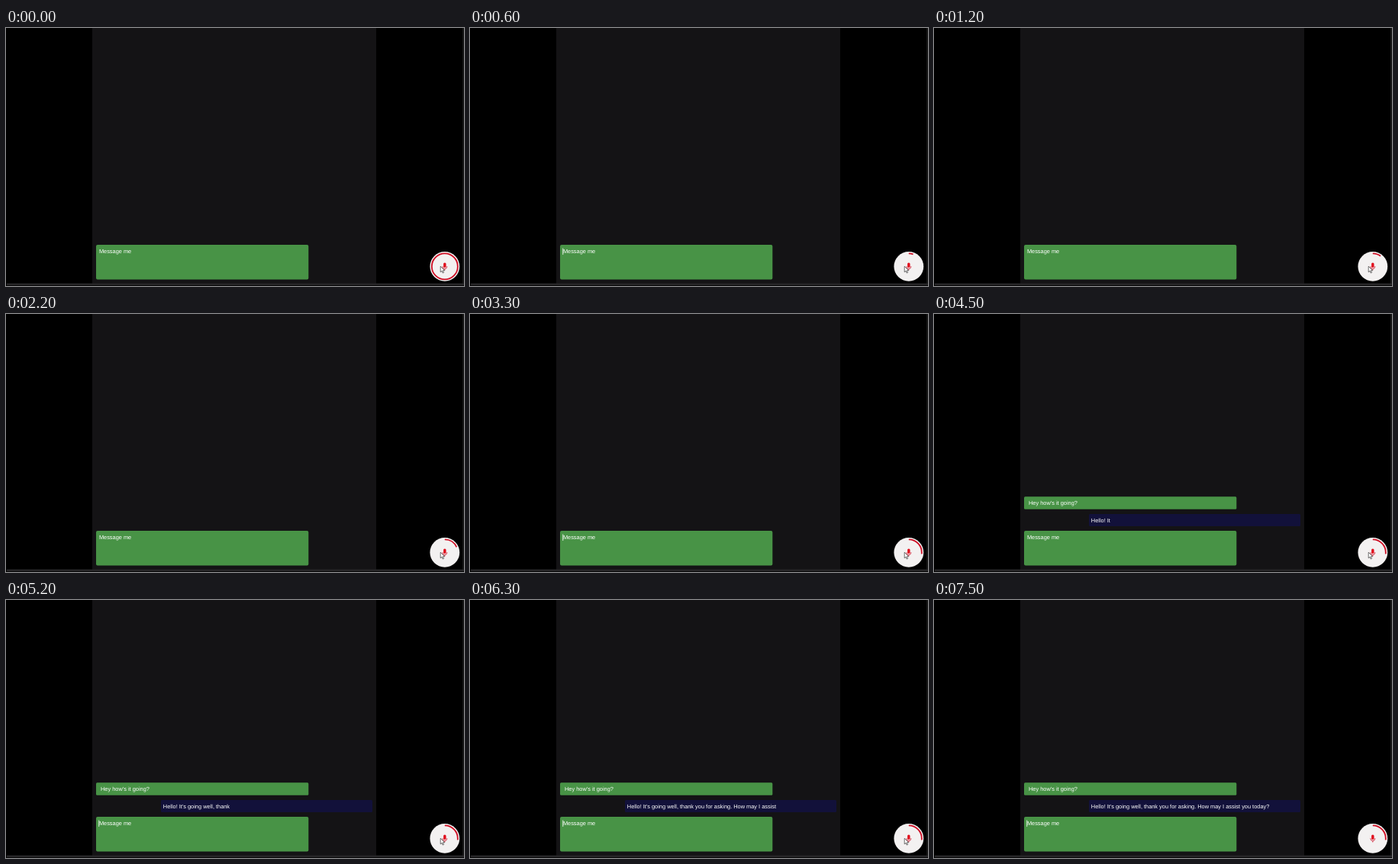
An HTML page for the animation above (8000 ms loop, 600 by 338 pixels).

```html
<!DOCTYPE html>
<html lang="en">
<head>
<meta charset="utf-8">
<title>Voice chat</title>
<style>
  html, body { margin: 0; width: 100%; height: 100%; overflow: hidden; background: #000; }
  svg { display: block; width: 100vw; height: 100vh; }
  text {
    font: 7.4px "Liberation Sans", Arial, sans-serif;
    fill: #fff;
    text-rendering: geometricPrecision;
    white-space: pre;
  }
  .user { fill: #489346; }
  .bot { fill: #12113a; }
  .red { fill: none; stroke: #cf0f25; }
</style>
</head>
<body>
<svg viewBox="0 0 600 338">
  <rect width="600" height="338"/>
  <rect x="113" width="372" height="335" fill="#141315"/>
  <rect x="598" width="2" height="335" fill="#171717"/>
  <rect x="1" y="334.5" width="599" height="2.7" fill="#272628"/>

  <g id="chat">
    <rect class="user" x="118" y="239.3" width="278.3" height="16.4" rx="1.5"/>
    <text x="124" y="250.2">Hey how's it going?</text>
    <rect class="bot" x="203" y="262" width="277" height="16" rx="1.5"/>
    <text id="reply" x="205.8" y="272.6"></text>
  </g>

  <rect class="user" x="118" y="284" width="278.3" height="45.4" rx="2"/>
  <text x="121.9" y="295.2">Message me</text>
  <rect id="caret" x="121.4" y="288.5" width="0.8" height="8.5" fill="#fff"/>

  <circle cx="574.8" cy="312.4" r="19.4" fill="#f3f1f1"/>
  <circle id="ring" class="red" cx="574.8" cy="312.4" r="17" stroke-width="1.8"
    pathLength="360" transform="rotate(-90 574.8 312.4)"/>
  <rect x="573.1" y="307.4" width="3.4" height="6.6" rx="1.7" fill="#e00a1c"/>
  <path class="red" d="M571.9 312v.6a2.9 2.9 0 0 0 5.8 0v-.6M574.8 315.5v2" stroke-width="0.8"/>
  <path id="pointer" d="M569.2 312.2v7.6l1.8-1.6 1.2 2.8 1.3-.6-1.2-2.7h2.4z"
    fill="#fff" stroke="#333" stroke-width="0.7"/>
</svg>
<script>
  const LOOP = 8000;
  const el = id => document.getElementById(id);
  const show = (id, on) => el(id).setAttribute("visibility", on ? "visible" : "hidden");

  // Reply pieces and the tenth of a second at which each arrives.
  const pieces = "Hello|!| It|'s| going| well|,| thank| you| for| asking|.| How| may| I| assist| you| today|?".split("|");
  const arrivals = [43, 44, 45, 47, 48, 49, 51, 52, 53, 54, 56, 57, 58, 60, 61, 63, 64, 65, 66];

  function caretOn(t) {
    return t < 2500 ? t % 1000 >= 500 : t < 4200 || t >= 4700;
  }

  function draw(t) {
    const angle = t < 100 ? 360 : 37 + (Math.min(t, 3300) - 1200) * 0.0286;
    el("ring").setAttribute("stroke-dasharray", angle >= 360 ? "none" : `${angle} 400`);
    el("reply").textContent =
      pieces.filter((_, i) => t >= arrivals[i] * 100).join("") || "...";
    show("chat", t >= 3600);
    show("caret", caretOn(t));
    show("pointer", t < 7300);
  }

  function frame() {
    const t = performance.now() % LOOP;
    draw(Math.floor(t / 100) * 100);
    requestAnimationFrame(frame);
  }
  frame();
</script>
</body>
</html>
```
